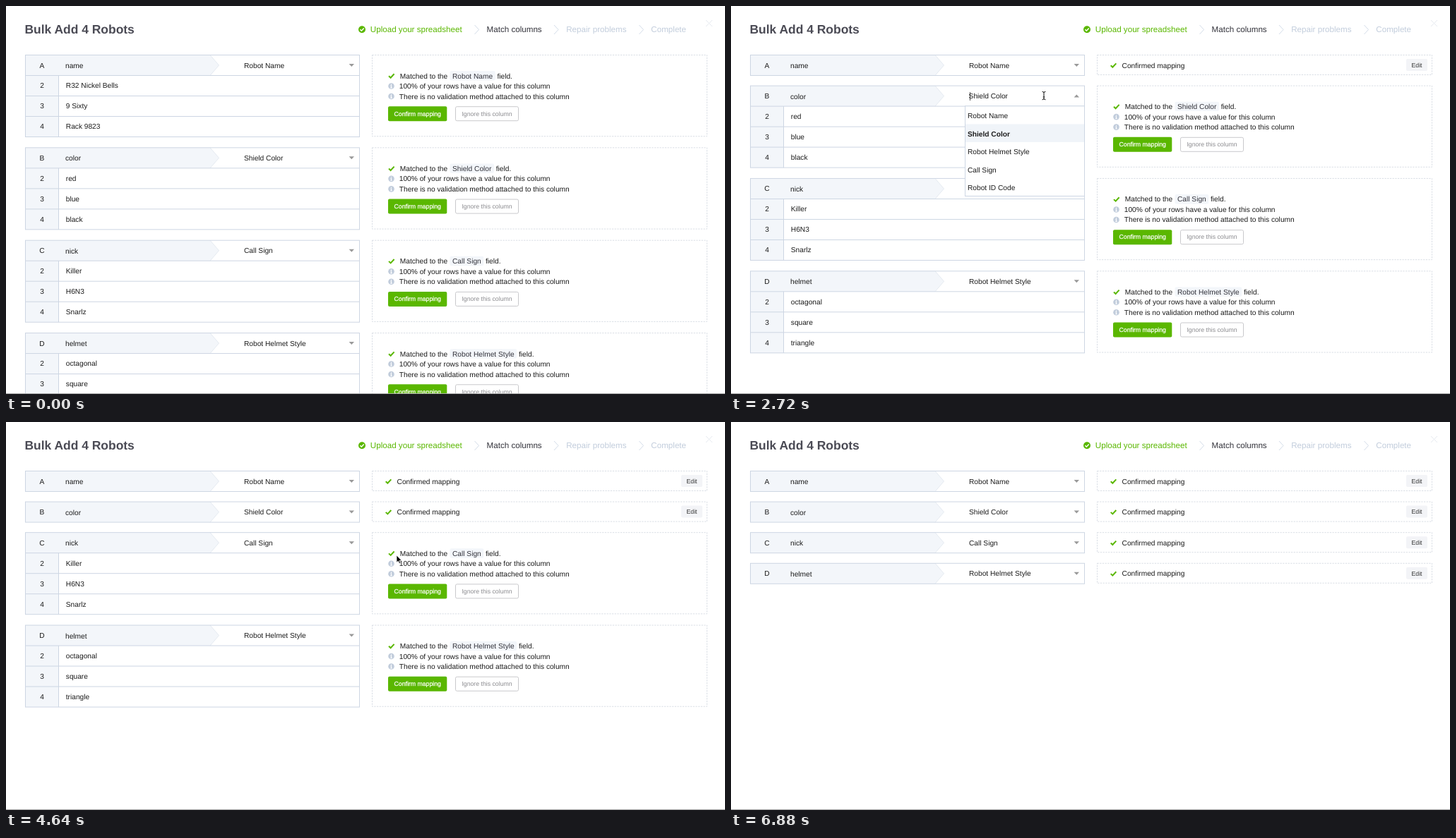
Animation, 1018 px wide and 550 px high, one loop 7200 ms. Source, as an HTML page:

```html
<!DOCTYPE html>
<html lang="en">
<head>
<meta charset="utf-8">
<title>Bulk add</title>
<style>
html, body { margin: 0; width: 100%; height: 100%; overflow: hidden; background: #fff; }
svg { display: block; width: 1018px; height: 550px; }
text { font-family: "Liberation Sans", Arial, Helvetica, sans-serif; text-rendering: geometricPrecision; white-space: pre; }
</style>
</head>
<body>
<svg id="stage" viewBox="0 0 1018 550"></svg>
<script>
const LOOP = 7200, STEP = 160;
const BODY = 10.18, SMALL = 8.73, NAV = 11.64;
const TOP = 69.5, ROW = 29, OPEN = 131.35, SHUT = 43.6;
const GREEN = '#5ab700', MID = '#3d8300', DARK = '#2b5a00';
const LINE = '#cdd6e3', PALE = '#f3f6fa', INK = '#1c1c1c', MUTED = '#c2cddc';

const blocks = [
  { key: 'A', name: 'name', field: 'Robot Name', rows: ['R32 Nickel Bells', '9 Sixty', 'Rack 9823'] },
  { key: 'B', name: 'color', field: 'Shield Color', rows: ['red', 'blue', 'black'] },
  { key: 'C', name: 'nick', field: 'Call Sign', rows: ['Killer', 'H6N3', 'Snarlz'] },
  { key: 'D', name: 'helmet', field: 'Robot Helmet Style', rows: ['octagonal', 'square', 'triangle'] }
];
const options = ['Robot Name', 'Shield Color', 'Robot Helmet Style', 'Call Sign', 'Robot ID Code'];
const confirmAt = [1600, 4640, 5760, 6560];

// from, to, block, button colour
const hot = [
  [1120, 1440, 0, MID], [1440, 1600, 0, DARK], [4480, 4640, 1, DARK],
  [5280, 5760, 2, MID], [6080, 6560, 3, MID]
];
// time, click ring radius
const rings = [[1280, 16], [2240, 16], [4480, 18], [5440, 12], [5600, 22], [6400, 18]];
// time, x, y
const path = [
  [320, 338, 544], [480, 372, 490], [800, 490, 290], [1120, 574, 158], [1280, 577, 152],
  [1600, 577, 152], [2080, 443, 127], [2880, 443, 127], [3040, 458, 130], [3360, 555, 172],
  [3520, 569, 180], [3840, 512, 136], [4160, 512, 136], [4480, 553, 189], [4640, 553, 189],
  [5120, 556, 234], [5760, 556, 234], [6080, 557, 281], [6400, 557, 281],
  [6560, 556, 312], [6720, 545, 506], [6880, 545, 506]
];
// time, cursor shape from then on
const shapes = [
  [320, 'arrow'], [1120, 'hand'], [1440, 'beam'], [1760, 'arrow'], [2080, 'beam'],
  [3200, 'arrow'], [4480, 'hand'], [4640, 'arrow'], [5120, 'hand'], [5760, 'arrow'],
  [6080, 'hand'], [6560, 'arrow']
];

const pen = document.createElement('canvas').getContext('2d');
pen.font = '100px "Liberation Sans", Arial, sans-serif';
const width = (s, size) => pen.measureText(s).width * size / 100;

const text = (s, x, y, size = BODY, fill = INK, extra = '') =>
  `<text x="${x}" y="${y}" font-size="${size}" fill="${fill}" ${extra}>${s}</text>`;
const rect = (x, y, w, h, fill, extra = '') =>
  `<rect x="${x}" y="${y}" width="${w}" height="${h}" fill="${fill}" ${extra}/>`;
const stroke = (d, color, w = 1, extra = '') =>
  `<path d="${d}" fill="none" stroke="${color}" stroke-width="${w}" ${extra}/>`;
const tick = (x, y) => stroke(`M${x - 3.8} ${y + .3}l2.6 2.5 5-5.4`, GREEN, 2);
const middle = 'text-anchor="middle"';

function info(x, y) {
  return `<circle cx="${x}" cy="${y}" r="4.3" fill="${MUTED}"/>` +
    stroke(`M${x} ${y - 2.7}v1.4M${x - 1} ${y - .4}h1v2.8M${x - 1.2} ${y + 2.4}h2.4`, '#fff', 1.1);
}

function header() {
  const chevrons = [663.5, 776, 896.5].map(x => stroke(`M${x} 27l6 6.5-6 6.5`, '#d3dce8')).join('');
  return text('Bulk Add 4 Robots', 26.5, 39.2, 17.45, '#4b4b55', 'font-weight="bold"') +
    `<circle cx="504" cy="33.2" r="5" fill="${GREEN}"/>` +
    stroke('M501.4 33.3l1.9 1.9 3.4-3.6', '#fff', 1.5) +
    text('Upload your spreadsheet', 515.8, 37.2, NAV, GREEN) +
    text('Match columns', 680.5, 37.2, NAV, '#33333b') +
    text('Repair problems', 793.2, 37.2, NAV, MUTED) +
    text('Complete', 913.3, 37.2, NAV, MUTED) + chevrons +
    stroke('M991 20l9 9m0-9l-9 9', '#e6eaf0');
}

function table(b, y, shut, open) {
  const h = shut ? ROW : ROW * 4;
  let s = rect(27.5, y, 473, h, '#fff') +
    `<path d="M27.5 ${y}H289l12.5 ${ROW / 2}L289 ${y + ROW}H27.5z" fill="${PALE}"/>` +
    stroke(`M289 ${y}l12.5 ${ROW / 2}L289 ${y + ROW}`, '#e0e6ee', .8);
  if (!shut) {
    s += rect(27.5, y + ROW, 47, ROW * 3, PALE);
    b.rows.forEach((r, i) => {
      const top = y + ROW * (i + 1);
      s += stroke(`M27.5 ${top}H500.5`, LINE) +
        text(i + 2, 51, top + 17.8, BODY, INK, middle) + text(r, 84.8, top + 17.8);
    });
    s += stroke(`M74.5 ${y + ROW}V${y + h}`, LINE);
  }
  const cy = y + 14.5;
  const caret = open ? `M485.6 ${cy + 2}h7.4l-3.7-4z` : `M485.6 ${cy - 2}h7.4l-3.7 4z`;
  return s + rect(27.5, y, 473, h, 'none', `stroke="${LINE}"`) +
    text(b.key, 51, y + 18, BODY, INK, middle) + text(b.name, 84, y + 18.6) +
    text(b.field, open ? 336.6 : 337, y + 18) + `<path d="${caret}" fill="#999"/>`;
}

function panel(b, y, shut, color) {
  const frame = h => rect(518.5, y, 474, h, '#fff', 'stroke="#d4dae1" stroke-dasharray="2.2 1.5" stroke-width=".9"');
  if (shut) {
    return frame(28) + tick(541.5, y + 14.5) + text('Confirmed mapping', 553.6, y + 18) +
      rect(956, y + 5.5, 30, 17, '#f3f4f7', 'rx="2"') +
      text('Edit', 971, y + 17.3, SMALL, '#333', middle);
  }
  const w = width(b.field, BODY);
  return frame(115.2) + tick(545.8, y + 29.4) + text('Matched to the', 557.8, y + 33) +
    rect(628.5, y + 22.6, w + 7, 13.4, PALE, 'rx="2"') +
    text(b.field, 632, y + 33, BODY, '#33333b') + text('field.', 638.3 + w, y + 33) +
    info(545.5, y + 44) + text('100% of your rows have a value for this column', 556.8, y + 47.5) +
    info(545.5, y + 58.5) + text('There is no validation method attached to this column', 556.8, y + 62) +
    rect(541, y + 72.7, 83.3, 21, color, 'rx="2"') +
    text('Confirm mapping', 582.7, y + 86, SMALL, '#fff', middle + ' stroke="#fff" stroke-width=".25"') +
    rect(636.5, y + 73.2, 89, 20, '#fff', 'rx="2" stroke="#c9c9cc"') +
    text('Ignore this column', 681, y + 86, SMALL, '#8a8a8e', middle);
}

function menu() {
  const h = 25.4;
  let s = rect(331.5, 141.8, 169, 127.7, '#fff', `stroke="${LINE}"`) + rect(332, 167.5, 168, h, '#f0f4f9');
  options.forEach((o, i) => {
    s += text(o, 335, 159.3 + i * h, BODY, INK, i === 1 ? 'font-weight="bold"' : '');
  });
  return s;
}

const cursors = {
  arrow: '<path d="M0 0V10.2L2.3 8.1 3.8 11.6 5.5 10.9 4 7.5H7.2Z" fill="#000" stroke="#fff" stroke-width=".7"/>',
  beam: stroke('M-2.4-5.6Q0-5.6 0-4V4Q0 5.8-2.4 5.8M2.4-5.6Q0-5.6 0-4M0 4Q0 5.8 2.4 5.8M-1.3 2h2.6', '#111'),
  hand: '<path d="M-1.2 5.6V.6Q-1.2-.4-.3-.4T.7.6V3.4Q2 2.6 2.7 3.7 4 3 4.6 4.2 6.2 3.8 6.2 5.3V7.2L5.2 10.6H.5L-3 6.2Q-3.4 4.6-1.2 5.6Z" fill="#fff" stroke="#111" stroke-width=".9" stroke-linejoin="round"/>'
};

function pointer(t) {
  if (t < 320 || t >= 6880) return '';
  const i = path.findIndex(p => p[0] > t);
  const [t0, x0, y0] = path[i - 1], [t1, x1, y1] = path[i];
  const k = (t - t0) / (t1 - t0);
  const x = x0 + (x1 - x0) * k, y = y0 + (y1 - y0) * k;
  const shape = shapes.filter(s => s[0] <= t).pop()[1];
  const ring = rings.find(r => r[0] === t);
  return `<g transform="translate(${x} ${y})">${cursors[shape]}` +
    (ring ? `<circle r="${ring[1]}" fill="none" stroke="#111" stroke-width="1.3"/>` : '') + '</g>';
}

function scene(t) {
  const open = t >= 2240 && t < 4160;
  const caret = t === 2240 || (t >= 2720 && t < 3200) || (t >= 3680 && t < 4160);
  let y = TOP, s = rect(0, 0, 1018, 550, '#fff') + header();
  blocks.forEach((b, i) => {
    const shut = t >= confirmAt[i];
    const press = hot.find(h => h[2] === i && t >= h[0] && t < h[1]);
    s += table(b, y, shut, open && i === 1) + panel(b, y, shut, press ? press[3] : GREEN);
    y += shut ? SHUT : OPEN;
  });
  if (open) s += menu();
  if (caret) s += rect(338, 122, .8, 12, '#222');
  return s + rect(0, 549, 1018, 1, '#a3a3a3') + pointer(t);
}

const stage = document.getElementById('stage');
let shown = -1;
function tickFrame(now) {
  const t = Math.floor(now % LOOP / STEP) * STEP;
  if (t !== shown) stage.innerHTML = scene(shown = t);
  requestAnimationFrame(tickFrame);
}
tickFrame(performance.now());
</script>
</body>
</html>
```
